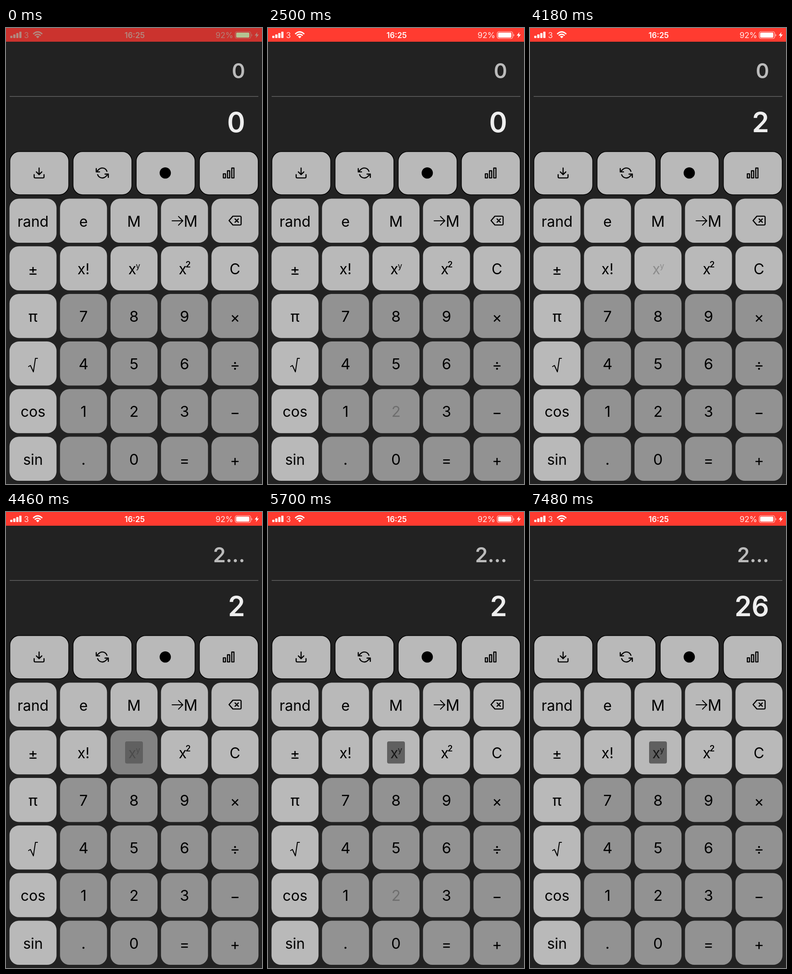
An HTML page for the animation above (8000 ms loop, 561x998 px).

```html
<!DOCTYPE html>
<html lang="en">
<head>
<meta charset="utf-8">
<title>Calculator</title>
<style>
  html, body { margin: 0; width: 100%; height: 100%; overflow: hidden; background: #222; }
  svg { display: block; width: 100%; height: 100%; font-family: Inter, "Open Sans", sans-serif; }
  .icon { fill: none; stroke: #000; stroke-width: 2; stroke-linecap: round; stroke-linejoin: round; }
</style>
</head>
<body>
<svg id="stage" viewBox="0 0 561 998"></svg>
<script>
const LOOP = 8000;
const LIGHT = [185, 185, 185], DARK = [146, 146, 146], PAGE = [34, 34, 34];
const stage = document.getElementById('stage');

function add(parent, tag, attrs, text) {
  const el = document.createElementNS('http://www.w3.org/2000/svg', tag);
  for (const name in attrs) el.setAttribute(name, attrs[name]);
  if (text !== undefined) el.textContent = text;
  parent.appendChild(el);
  return el;
}
const label = (parent, x, y, size, text, extra) =>
  add(parent, 'text', { x, y, 'font-size': size, 'text-anchor': 'middle', ...extra }, text);
// Icons are drawn on a 24 unit grid.
const icon = (x, y, d) =>
  add(stage, 'path', { class: 'icon', d, transform: `translate(${x} ${y}) scale(1.2) translate(-12 -12)` });

const clamp = v => Math.max(0, Math.min(1, v));
const ease = v => v < 0.5 ? 2 * v * v : 1 - 2 * (1 - v) ** 2;
const mix = (a, b, k) => `rgb(${a.map((v, i) => Math.round(v + (b[i] - v) * k))})`;

// Status bar
const bar = add(stage, 'rect', { width: 561, height: 30 });
const status = add(stage, 'g', {});
for (let i = 0; i < 4; i++)
  add(status, 'rect', { x: 9.3 + i * 6.6, y: 17 - i * 3, width: 4.8, height: 5 + i * 3, rx: 1.2 });
label(status, 44.7, 22, 17, '3', { opacity: 0.85 });
add(status, 'path', {
  d: 'M59.5 13.2Q69.5 3.8 79.5 13.2M63 16.5Q69.5 10.6 76 16.5',
  fill: 'none', stroke: 'currentColor', 'stroke-width': 2.7
});
add(status, 'path', { d: 'M65.7 18.7Q69.5 15.8 73.3 18.7L69.5 22.5Z' });
label(status, 282, 21.7, 17, '16:25', { 'font-weight': 600 });
label(status, 478.5, 21.8, 17.5, '92%', { opacity: 0.9 });
add(status, 'rect', {
  x: 502.3, y: 8, width: 34, height: 15, rx: 4,
  fill: 'none', stroke: 'currentColor', 'stroke-width': 1.2, opacity: 0.8
});
const charge = add(status, 'rect', { x: 504.3, y: 10, width: 29, height: 11, rx: 2 });
add(status, 'path', { d: 'M538 13Q541 15.5 538 18.5Z', opacity: 0.8 });
add(status, 'path', { d: 'M551 9L545 16.5H549L547.5 22L554 14.2H549.8Z' });

// Display
const readout = (y, size, fill) => add(stage, 'text', {
  x: 524, y, 'font-size': size, fill, 'font-weight': 600, 'text-anchor': 'end'
});
const upper = readout(109.5, 44.5, '#bbb');
const lower = readout(228, 60, '#eee');
add(stage, 'rect', { x: 8, y: 149, width: 545, height: 1.4, fill: '#666' });

// Toolbar
for (let i = 0; i < 4; i++)
  add(stage, 'rect', {
    x: 8.5 + i * 138.4, y: 270.5, width: 129, height: 94.5, rx: 21,
    fill: mix(LIGHT, LIGHT, 0), stroke: '#000', 'stroke-width': 1.6
  });
icon(72.5, 317.3, 'M21 15v4a2 2 0 0 1-2 2H5a2 2 0 0 1-2-2v-4M7 10l5 5 5-5M12 15V3');
icon(211, 317.3, 'M1 4v6h6M23 20v-6h-6M20.5 9A9 9 0 0 0 5.6 5.6L1 10M23 14l-4.6 4.4A9 9 0 0 1 3.5 15');
add(stage, 'circle', { cx: 349, cy: 317.3, r: 12.3 });
icon(488, 317.3, 'M2.2 13.5h4V21h-4zM9.8 8h4v13h-4zM17.6 3h4v18h-4z');

// Keypad
const rows = ['rand e M →M del', '± x! xy x2 C', 'π 7 8 9 ×', '√ 4 5 6 ÷', 'cos 1 2 3 −', 'sin . 0 = +'];
const keys = {};
rows.forEach((row, r) => row.split(' ').forEach((name, c) => {
  const x = 7.7 + c * 110.65, y = 373.5 + r * 104.2, cx = x + 51.5, base = y + 61;
  const color = c > 0 && r > 1 ? DARK : LIGHT;
  const back = add(stage, 'rect', { x, y, width: 103, height: 96.5, rx: 20.5 });
  const box = name === 'xy' &&
    add(stage, 'rect', { x: 261, y: 502, width: 39, height: 48.5, rx: 4, fill: '#606060' });
  const face = add(stage, 'g', {});
  if (name === 'del') {
    icon(502, 421.5, 'M21 4H8l-7 8 7 8h13a2 2 0 0 0 2-2V6a2 2 0 0 0-2-2zM18 9l-6 6M12 9l6 6');
  } else if (name === '→M') {
    add(face, 'path', { class: 'icon', d: 'M364 422H387M378 412.5l9.5 9.5-9.5 9.5', 'stroke-width': 2.4 });
    label(face, 404.7, base, 33.5, 'M');
  } else if (name === '√') {
    add(face, 'path', { class: 'icon', d: 'M49.5 741l4-2.5 6.5 14 4.5-29.5h4.5' });
  } else if (name === 'xy' || name === 'x2') {
    label(face, cx - 3.8, base, 32, 'x');
    if (name === 'xy') label(face, cx + 8.8, base - 11.5, 17, 'y');
    else label(face, cx + 8, base - 15, 18, '2', { 'font-weight': 600 });
  } else {
    const size = /^[a-zC]/.test(name) ? 32 : 33;
    label(face, cx, base + (/[×÷−+=±]/.test(name) ? 2 : 0), size, name);
  }
  keys[name] = { back, box, face, color };
}));

const presses = [
  { key: '2', down: 2500, up: 2740 },
  { key: 'xy', down: 4180, up: 4420 },
  { key: '2', down: 5700, up: 5840 },
  { key: '6', down: 6680, up: 6920 }
];

function render(t) {
  const wake = clamp((t - 10) / 250);
  bar.setAttribute('fill', mix([203, 51, 46], [255, 59, 48], wake));
  const ink = mix([178, 137, 128], [255, 255, 255], wake);
  status.setAttribute('fill', ink);
  status.setAttribute('color', ink);
  charge.setAttribute('fill', mix([180, 196, 146], [255, 255, 255], wake));

  const chosen = t >= 4420;
  upper.textContent = chosen ? '2...' : '0';
  lower.textContent = t < 2740 ? '0' : t < 6920 ? '2' : '26';
  keys.xy.box.setAttribute('visibility', chosen ? 'visible' : 'hidden');

  for (const name in keys) {
    const { back, face, color } = keys[name];
    const press = presses.filter(p => p.key === name && t >= p.down).pop();
    let glow = 1, alpha = 1;
    if (press) {
      alpha = 0.24 + 0.76 * ease(clamp((t - press.up) / 250));
      if (t >= press.up) glow = 0.63 + 0.37 * ease(clamp((t - press.up) / 550));
    }
    if (name === 'xy' && chosen) alpha *= 0.75;
    face.setAttribute('opacity', alpha);
    back.setAttribute('fill', mix(PAGE, color, glow));
  }
}

const start = performance.now();
function frame() {
  render((performance.now() - start) % LOOP);
  requestAnimationFrame(frame);
}
render(0);
requestAnimationFrame(frame);
</script>
</body>
</html>
```
